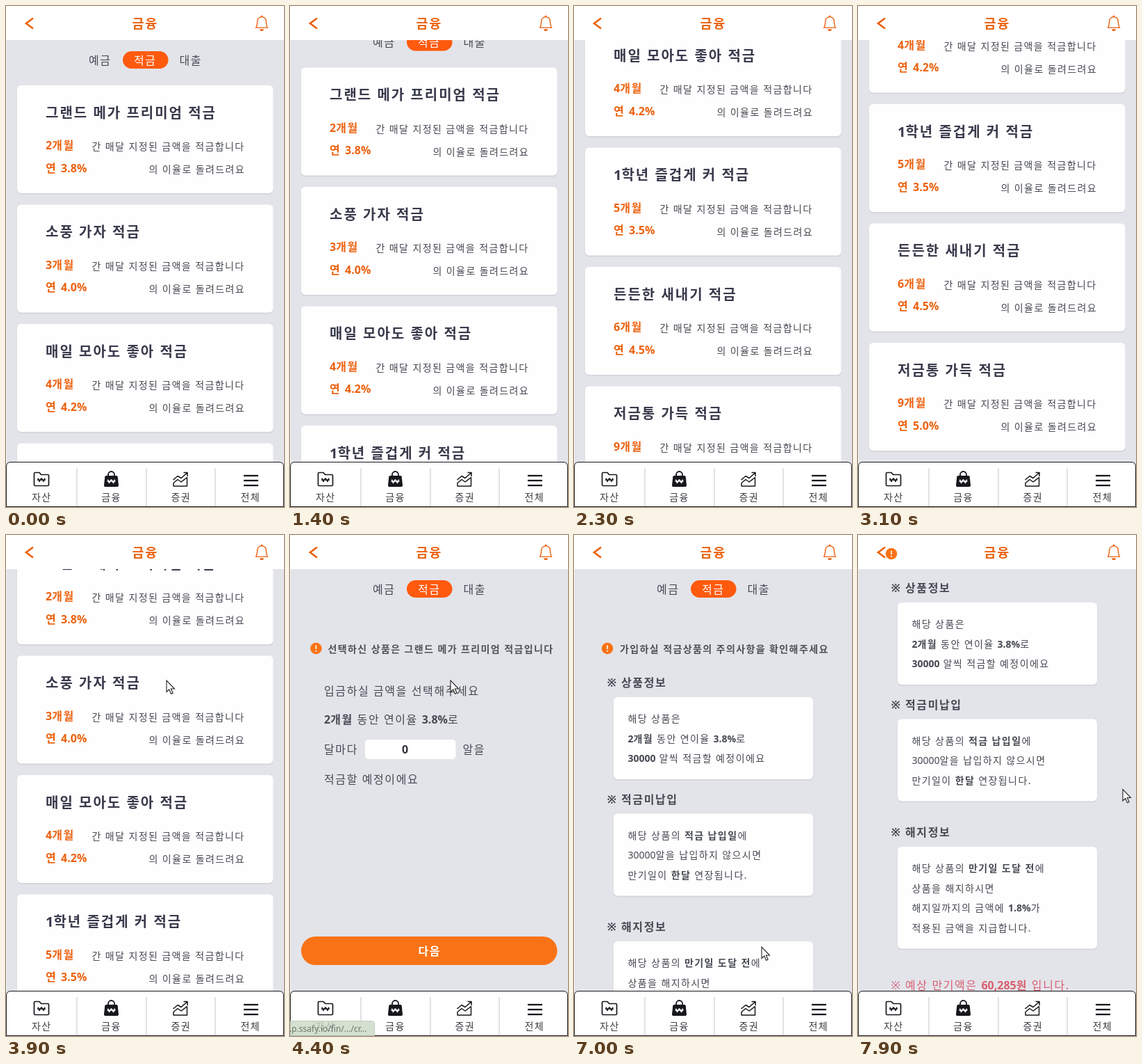
Recreate the animation shown at these times as an HTML page. Size 400x720 px, loop 8 s.

```html
<!DOCTYPE html>
<html lang="ko">
<head>
<meta charset="utf-8">
<title>적금</title>
<style>
  html, body { margin: 0; width: 100%; height: 100%; overflow: hidden; background: #e3e4ea; }
  svg { display: block; width: 400px; height: 720px; }
  text { font-family: "Noto Sans", "Noto Sans CJK KR", "Noto Sans CJK", sans-serif; letter-spacing: .1em; }
  .num { letter-spacing: 0; }
  .bold { font-weight: 700; }
</style>
</head>
<body>
<svg id="stage" viewBox="0 0 400 720"></svg>
<script>
const LOOP = 8000;
const ORANGE = '#f97316', DEEP = '#ec6210', INK = '#464952', DARK = '#383a4b', BLACK = '#17181c';

// Text centred vertically on cy; *stars* mark bold parts.
function text(x, cy, size, str, fill = INK, attrs = '') {
  const body = str.split('*').map((part, i) => {
    const runs = part.replace(/[0-9.,%]+/g, n => `<tspan class="num">${n}</tspan>`);
    return i % 2 ? `<tspan class="bold">${runs}</tspan>` : runs;
  }).join('');
  return `<text x="${x}" y="${cy + size * .38}" font-size="${size}" fill="${fill}" ${attrs}>${body}</text>`;
}
const rect = (x, y, w, h, r, fill, attrs = '') =>
  `<rect x="${x}" y="${y}" width="${w}" height="${h}" rx="${r}" fill="${fill}" ${attrs}/>`;
const line = (d, color, width, attrs = '') =>
  `<path d="${d}" fill="none" stroke="${color}" stroke-width="${width}" stroke-linejoin="round" ${attrs}/>`;
const card = (x, y, w, h) =>
  rect(x - .5, y + 1, w + 1, h + 1, 6.5, '#d6d7de') + rect(x, y, w, h, 6, '#fefefe');
const alertIcon = x =>
  `<circle cx="${x}" cy="163" r="8.3" fill="${ORANGE}"/>` +
  line(`M${x} 158.5v5.5`, '#fff', 1.6) + `<circle cx="${x}" cy="166.8" r="1" fill="#fff"/>`;

const products = [
  ['그랜드 메가 프리미엄 적금', 2, '3.8'],
  ['소풍 가자 적금', 3, '4.0'],
  ['매일 모아도 좋아 적금', 4, '4.2'],
  ['1학년 즐겁게 커 적금', 5, '3.5'],
  ['든든한 새내기 적금', 6, '4.5'],
  ['저금통 가득 적금', 9, '5.0']
];

const tabs = text(119, 77.5, 16, '예금') + rect(168, 65, 65.5, 25, 12.5, '#ff5a0e') +
  text(184, 77.5, 16, '적금', '#fff') + text(249.5, 77.5, 16, '대출');

const list = products.map(([name, months, rate], i) => {
  const y = 114 + i * 171.5;
  return card(16, y, 368.5, 155) +
    text(57, y + 39, 20, `*${name}*`, DARK) +
    text(57, y + 86, 16, `*${months}개월*`, DEEP) +
    text(123.5, y + 88, 14, '간 매달 지정된 금액을 적금합니다') +
    text(57, y + 118.5, 16, `*연 ${rate}%*`, DEEP) +
    text(205.5, y + 121, 14, '의 이율로 돌려드려요');
}).join('');

const form = alertIcon(37.5) +
  text(54.5, 163.5, 14, `*선택하신 상품은 ${products[0][0]}입니다*`, '#4f5159') +
  text(49, 224, 16, '입금하실 금액을 선택해주세요') +
  text(49, 265, 16, '*2개월* 동안 연이율 *3.8%*로') +
  text(49, 308, 16, '달마다') + text(248.5, 308, 16, '알을') +
  text(49, 351, 16, '적금할 예정이에요') +
  rect(108, 294, 130.5, 28, 5, '#fff') +
  `<g id="focus">${rect(108, 294, 130.5, 28, 5, 'none', `stroke="${BLACK}" stroke-width="2"`)}
    <path d="M225 304.5l4-4 4 4zM225 312l4 4 4-4z" fill="#444"/></g>` +
  `<text id="value" class="num bold" x="165.5" y="313.8" font-size="16" text-anchor="middle" fill="#30323a"></text>` +
  rect(0, 299, 1.2, 18, 0, '#222', 'id="caret"') +
  rect(16, 577, 368.5, 41, 20.5, ORANGE) + text(184.5, 598, 16, '*다음*', '#fff');

const heading = (cy, str) => text(47.5, cy, 16, '*※*') + text(68, cy, 16, `*${str}*`);
const info = (y, h, lines) => card(57, y, 287, h) +
  lines.map((s, i) => text(77.5, y + 31 + i * 28.5, 14, s)).join('');

const review = text(66, 163.5, 14, '*가입하실 적금상품의 주의사항을 확인해주세요*', '#4f5159') +
  heading(212, '상품정보') +
  info(233, 118, ['해당 상품은', '*2개월* 동안 연이율 *3.8%*로', '*30000* 알씩 적금할 예정이에요']) +
  heading(379.5, '적금미납입') +
  info(400.5, 118, ['해당 상품의 *적금 납입일*에', '30000알을 납입하지 않으시면', '만기일이 *한달* 연장됩니다.']) +
  heading(563, '해지정보') +
  info(584, 146.5, ['해당 상품의 *만기일 도달 전*에', '상품을 해지하시면',
    '해지일까지의 금액에 *1.8%*가', '적용된 금액을 지급합니다.']) +
  text(47.5, 783, 16, '※', '#cf607c') +
  text(68, 783, 16, '예상 만기액은 *60,285원* 입니다.', '#d85f70');

const bell = `<path transform="translate(356.8 13.600) scale(1.4)" fill="${DEEP}" d="M8 16a2 2 0 0 0 2-2H6a2 2 0 0 0 2 2M8 1.918l-.797.161A4 4 0 0 0 4 6c0 .628-.134 2.197-.459 3.742-.16.767-.376 1.566-.663 2.258h10.244c-.287-.692-.502-1.49-.663-2.258C12.134 8.197 12 6.628 12 6a4 4 0 0 0-3.203-3.92zM14.22 12c.223.447.481.801.78 1H1c.299-.199.557-.553.78-1C2.68 10.2 3 6.88 3 6c0-2.42 1.72-4.44 4.005-4.901a1 1 0 1 1 1.99 0A5 5 0 0 1 13 6c0 .88.32 4.2 1.22 6"/>`;
const header = rect(0, 0, 400, 49, 0, '#fff') +
  line('M39 17.500L29 25l10 7.500', DEEP, 2.700, 'style="stroke-linejoin:miter"') +
  text(181.5, 25, 18.500, '*금융*', DEEP) + bell;

const won = color => line('M-5-2.500l2 5 2.500-4.500h1l2.500 4.500 2-5M-6 0h12', color, 1.5);
const nav = `<path d="M.5 719.500V662q0-6.500 6.500-6.500h386q6.500 0 6.500 6.500v57.500z" fill="#fff" stroke="${BLACK}"/>` +
  [102, 202, 301].map(x => line(`M${x} 664V719`, '#e2e2e6', 2)).join('') +
  line('M40.500 672q0-1.500 1.500-1.500h6l2.500 3h9.500q1.500 0 1.500 1.500v13q0 1.500-1.500 1.500h-18q-1.500 0-1.500-1.500z', BLACK, 1.7) +
  `<g transform="translate(51 681)">${won(BLACK)}</g>` +
  `<path d="M144 675h15q1.500 0 1.700 1.500l1.300 12q.2 2.500-2.300 2.500h-16.400q-2.500 0-2.300-2.500l1.300-12q.2-1.500 1.700-1.500z" fill="${BLACK}"/>` +
  line('M147 676v-2.500a4.500 4.500 0 0 1 9 0v2.500', BLACK, 1.8) +
  `<g transform="translate(151.500 683)">${won('#fff')}</g>` +
  line('M240.500 681l6.500-5.500 5 3 8.500-7.500M255.500 670.500h5.500v5.500M241 690v-4.500l6-5 5 3.500 8.500-6.500v12.500z', BLACK, 1.5) +
  [675, 682, 689].map(y => line(`M342 ${y}h21`, BLACK, 2.3)).join('') +
  ['자산', '금융', '증권', '전체'].map((s, i) => text(37 + i * 100.2, 706, 14, s, '#3c3d43')).join('');

const status = `<g id="status">${rect(-6, 698.5, 127.5, 28, 4, '#cbdac6', 'stroke="#b3c2ae"')}
  <text x="-1" y="713.5" font-size="12" style="letter-spacing:0" fill="#4c574b">.p.ssafy.io/fin/.../cr...</text></g>`;
const cursor = '<path id="cursor" d="M0 0V16.500l3.800-3.500 2.700 6.300 2.600-1.100-2.700-6.200h5.100z" fill="#fff" stroke="#222" stroke-width="1.1"/>';

document.getElementById('stage').innerHTML =
  rect(0, 0, 400, 720, 0, '#e3e4ea') + rect(0, 0, 1, 720, 0, '#f3f3f5') +
  `<g id="scroll">${tabs}<g id="list">${list}</g><g id="form">${form}</g><g id="review">${review}</g></g>` +
  header + `<g id="badge">${alertIcon(48)}</g>` + nav + status + cursor;

const el = id => document.getElementById(id);
const show = (id, on) => el(id).setAttribute('visibility', on ? 'inherit' : 'hidden');
const move = (id, x, y) => el(id).setAttribute('transform', `translate(${x} ${y})`);

// Linear reading of [time, value] steps.
function at(steps, t) {
  const i = steps.findIndex(s => s[0] > t);
  if (i === 0) return steps[0][1];
  if (i < 0) return steps[steps.length - 1][1];
  const [t0, a] = steps[i - 1], [t1, b] = steps[i];
  return a + (b - a) * (t - t0) / (t1 - t0);
}

const OPEN = 4250, FOCUS = 4900, NEXT = 7000;
const KEYS = [5200, 5350, 5500, 5650, 5800];
const scrollSteps = [[1300, 0], [1400, 25], [1900, 226.5], [2300, 424.5], [2500, 475], [2700, 487.5],
  [3550, 487.5], [3650, 430], [3950, 50], [4100, 0], [7700, 0], [7800, 85], [7890, 136]];
const cursorX = [[4500, 231], [4850, 185], [5100, 185], [6500, 360], [6800, 270], [7100, 270], [7550, 381]];
const cursorY = [[4500, 209], [4850, 305], [5100, 305], [6500, 470], [6800, 592], [7100, 592], [7550, 365.5]];
const statusSteps = [[3950, 0], [4050, 1], [4380, 1], [4500, 0]];

function draw(t) {
  const y = Math.round(at(scrollSteps, t) * 2) / 2;
  move('scroll', 0, -y);
  move('badge', 0, -y);
  const onForm = t >= OPEN && t < NEXT;
  show('list', t < OPEN);
  show('form', onForm);
  show('review', t >= NEXT);
  show('badge', t >= NEXT);

  const typed = KEYS.filter(k => k <= t);
  const value = '30000'.slice(0, typed.length) || '0';
  const last = typed.length ? typed[typed.length - 1] : FOCUS;
  const focused = onForm && t >= FOCUS;
  el('value').textContent = value;
  show('focus', focused);
  show('caret', focused && (t - last) % 1000 < 500);
  move('caret', 165.5 + value.length * 4.6 + .5, 0);

  el('status').setAttribute('opacity', at(statusSteps, t));
  show('cursor', t >= 3600 && t < 5150 || t >= 6500);
  move('cursor', at(cursorX, t), at(cursorY, t));
}

const start = performance.now();
function tick() {
  draw((performance.now() - start) % LOOP);
  requestAnimationFrame(tick);
}
tick();
</script>
</body>
</html>
```
